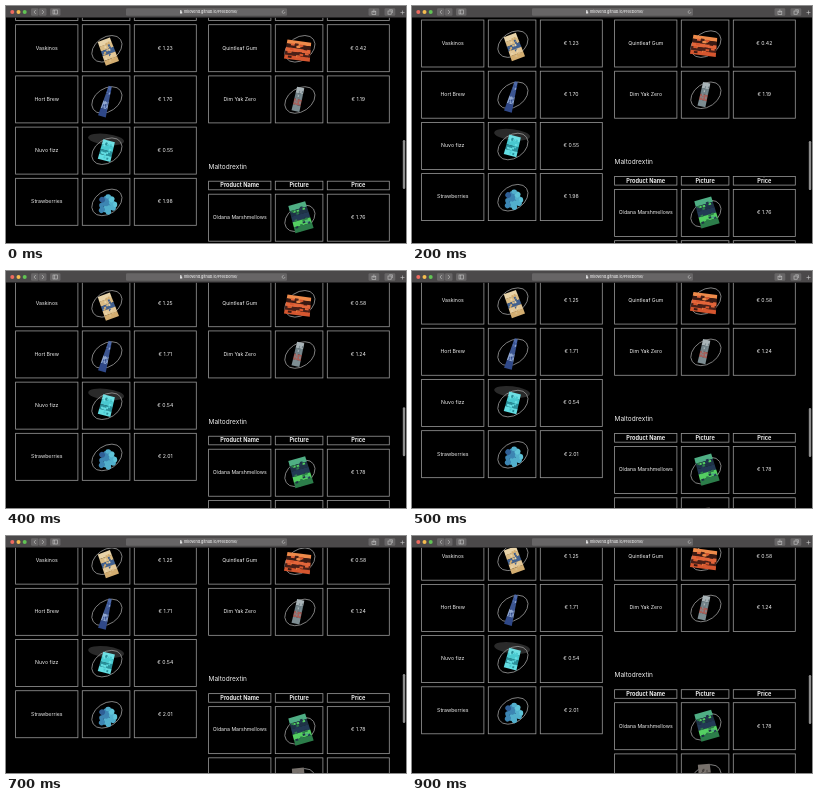
Write an HTML page with a canvas that moves like this. It is 400 px wide and 237 px high and loops after 1000 ms.

```html
<!DOCTYPE html>
<html lang="en">
<head>
<meta charset="utf-8">
<title>Price list</title>
<style>
  html, body { margin: 0; width: 100%; height: 100%; overflow: hidden; background: #000; }
  canvas { display: block; }
</style>
</head>
<body>
<canvas id="stage" width="400" height="237"></canvas>
<script>
const ctx = document.getElementById('stage').getContext('2d');
const FONT = 'Inter, "Open Sans", sans-serif';
const ROW = 51.2, CELL = 47, TOP = 18.7;
const LEFT = 9.6, RIGHT = 202.6;
const COLUMNS = [[0, 62.3], [66.7, 47.6], [118.7, 62]];
const PRICE_STEP = 4;

// Pictures: size, tilt, shift from the cell centre, top-to-bottom colours
const pack = (w, h, tilt, dx, dy, colors, extra) => ({ w, h, tilt, dx, dy, colors, ...extra });
const left = [
  ['Vaskinos', pack(14, 25, -0.35, 2, 3.5, ['#e8d3a8', '#d9bb85', '#41608f', '#e3c797', '#d3ad70']), '1.23', '1.25'],
  ['Hort Brew', pack(8, 31, 0.27, 0, 2, ['#4e69a8', '#3c5590', '#8fa6d0', '#2f4888'], { taper: 0.4 }), '1.70', '1.71'],
  ['Nuvo fizz', pack(13, 20, 0.25, 0.5, 0, ['#6fe0e4', '#4ac9d0', '#2a8f9a', '#62dde2'], { cloud: true }), '0.55', '0.54'],
  ['Strawberries', pack(21, 21, 0.2, 1.5, 3, ['#2f5f96', '#3d86b3', '#52b0cd', '#5fc4d8'], { pile: true }), '1.98', '2.01']
];
const right = [
  ['Quintleaf Gum', pack(26, 19, 0.13, -1, 2.5, ['#ee8a4a', '#3a1a14', '#e2653a', '#4a2018', '#d5562f']), '0.42', '0.58'],
  ['Dim Yak Zero', pack(8, 24, 0.22, -1, 0, ['#a9b4b8', '#6f8087', '#a8605a', '#7d8d92']), '1.19', '1.24']
];
const lower = [
  ['Oldana Marshmellows', pack(19, 28, -0.28, 1.5, -0.5, ['#4fae84', '#1f3347', '#233a55', '#54cf62', '#2c7d4a']), '1.76', '1.78'],
  ['', pack(13, 26, -0.1, 0, 0, ['#77716c', '#45403d', '#5c5652'])]
];

function random(seed) {
  return () => {
    seed = (seed * 16807) % 2147483647;
    return seed / 2147483647;
  };
}

function text(str, x, y, size = 5.2, weight = 400, align = 'center') {
  ctx.font = `${weight} ${size}px ${FONT}`;
  ctx.textAlign = align;
  ctx.textBaseline = 'middle';
  ctx.fillStyle = '#f0f0f0';
  ctx.fillText(str, x, y);
}

function rect(color, x, y, w, h, r = 0) {
  ctx.fillStyle = color;
  ctx.beginPath();
  ctx.roundRect(x, y, w, h, r);
  ctx.fill();
}

function oval(color, x, y, rx, ry = rx, tilt = 0) {
  ctx.fillStyle = color;
  ctx.beginPath();
  ctx.ellipse(x, y, rx, ry, tilt, 0, 7);
  ctx.fill();
}

function frame(x, y, w, h, color = '#979797', width = 0.8) {
  ctx.strokeStyle = color;
  ctx.lineWidth = width;
  ctx.strokeRect(x, y, w, h);
}

function line(...p) {
  ctx.strokeStyle = '#c8c8c8';
  ctx.lineWidth = 0.6;
  ctx.beginPath();
  for (let i = 0; i < p.length; i += 2) ctx.lineTo(p[i], p[i + 1]);
  ctx.stroke();
}

function drawPile({ w, h, colors }, rnd) {
  for (let i = 0; i < 16; i++) {
    const a = i * 2.4, r = Math.sqrt(i / 16) * 0.4;
    const x = Math.cos(a) * r * w, y = Math.sin(a) * r * h;
    const shade = Math.floor((x / w + 0.5 + rnd() * 0.3 - 0.15) * colors.length);
    oval(colors[Math.max(0, Math.min(colors.length - 1, shade))], x, y, 2 + rnd() * 1.6, 2.8, a);
  }
}

function drawPack({ w, h, colors, taper = 0.92 }, rnd) {
  const n = colors.length;
  const half = f => w / 2 * (taper + (1 - taper) * f);
  colors.forEach((color, i) => {
    const a = i / n, b = (i + 1) / n;
    ctx.fillStyle = color;
    ctx.beginPath();
    ctx.moveTo(-half(a), (a - 0.5) * h);
    ctx.lineTo(half(a), (a - 0.5) * h);
    ctx.lineTo(half(b), (b - 0.5) * h + 0.2);
    ctx.lineTo(-half(b), (b - 0.5) * h + 0.2);
    ctx.fill();
  });
  // Printed details
  for (let i = 0; i < 18; i++) {
    const f = 0.1 + rnd() * 0.75;
    const x = (rnd() * 1.5 - 0.9) * half(f);
    rect(colors[Math.floor(rnd() * n)], x, (f - 0.5) * h, w * 0.14, 2);
  }
}

function picture(p, x, y) {
  const rnd = random(p.w * 1000 + p.h);
  ctx.save();
  ctx.translate(x, y);
  if (p.cloud) oval('#2a2a2a', 0, -11, 18, 5.5, 0.12);
  ctx.strokeStyle = '#8e8e8e';
  ctx.lineWidth = 0.9;
  ctx.beginPath();
  ctx.ellipse(0.8, 0.8, 16.5, 11.5, -0.6, 0, 7);
  ctx.stroke();
  ctx.translate(p.dx, p.dy);
  ctx.rotate(p.tilt);
  (p.pile ? drawPile : drawPack)(p, rnd);
  ctx.restore();
}

function cells(x, y, h) {
  for (const [dx, w] of COLUMNS) frame(x + dx, y, w, h);
}

function labels(x, y, strings, ...style) {
  COLUMNS.forEach(([dx, w], i) => text(strings[i], x + dx + w / 2, y, ...style));
}

function table(rows, x, top, changed) {
  rows.forEach(([name, pic, before, after], i) => {
    const y = top + i * ROW, mid = y + CELL / 2 - 0.2;
    cells(x, y, CELL);
    picture(pic, x + 90.5, mid);
    labels(x, mid, [name, '', before ? '€ ' + (changed ? after : before) : '']);
  });
}

function toolbar() {
  rect('#4b494a', 0, 0, 400, 11.5);
  rect('#242324', 0, 11, 400, 0.8);
  ['#ee6a5f', '#f5bd4f', '#61c454'].forEach((c, i) => oval(c, 6.3 + i * 6.2, 6, 2));

  const button = (x, w) => rect('#676566', x, 2.3, w, 7.4, 1.3);
  button(25, 7.5);
  button(33, 7.5);
  button(44, 10.5);
  button(362.5, 10.8);
  button(378.5, 10.8);
  for (const x of [28, 36]) {
    const d = x < 30 ? 0.9 : -0.9;
    line(x + 0.9 + d, 4, x + 0.9 - d, 6, x + 0.9 + d, 8);
  }
  frame(47, 4, 4.6, 4, '#c8c8c8', 0.6);
  line(48.6, 4, 48.6, 8);
  frame(366, 5.2, 3.8, 3.2, '#c8c8c8', 0.6);
  line(367.9, 7, 367.9, 3.4);
  frame(382, 5, 3.2, 3.2, '#c8c8c8', 0.6);
  line(383.2, 3.8, 386.4, 3.8, 386.4, 7);
  line(394.5, 6.5, 398.5, 6.5);
  line(396.5, 4.5, 396.5, 8.5);

  button(120, 161);
  rect('#e0e0e0', 174, 5.4, 2.2, 2.2, 0.3);
  frame(174.5, 4.4, 1.2, 1.4, '#e0e0e0', 0.4);
  text('milovend.github.io/FreeDome/', 178, 6.2, 3.7, 500, 'left');
  ctx.beginPath();
  ctx.arc(277.5, 6, 1.4, 0, 5);
  ctx.stroke();
}

// Nearly steady scroll: slow start, gentle stop
function scrollAt(step) {
  const p = step / 9;
  return 21.5 * (p + 0.45 * p * (1 - p) * (p - 0.27));
}

function draw(step) {
  const scroll = scrollAt(step), changed = step >= PRICE_STEP;
  rect('#000', 0, 0, 400, 237);

  ctx.save();
  ctx.translate(0, -scroll);
  for (const x of [LEFT, RIGHT]) cells(x, TOP - ROW, CELL);
  table(left, LEFT, TOP, changed);
  table(right, RIGHT, TOP, changed);
  text('Maltodrextin', RIGHT, 160.8, 6.5, 400, 'left');
  cells(RIGHT, 175.2, 8.6);
  labels(RIGHT, 179.7, ['Product Name', 'Picture', 'Price'], 5.6, 700);
  table(lower, RIGHT, 188.2, changed);
  ctx.restore();

  rect('#8c8c8c', 396.8, 134 + scroll * 0.23, 2.4, 49, 1.2);
  toolbar();
}

function tick() {
  draw(Math.floor(performance.now() % 1000 / 100));
  requestAnimationFrame(tick);
}
tick();
</script>
</body>
</html>
```
